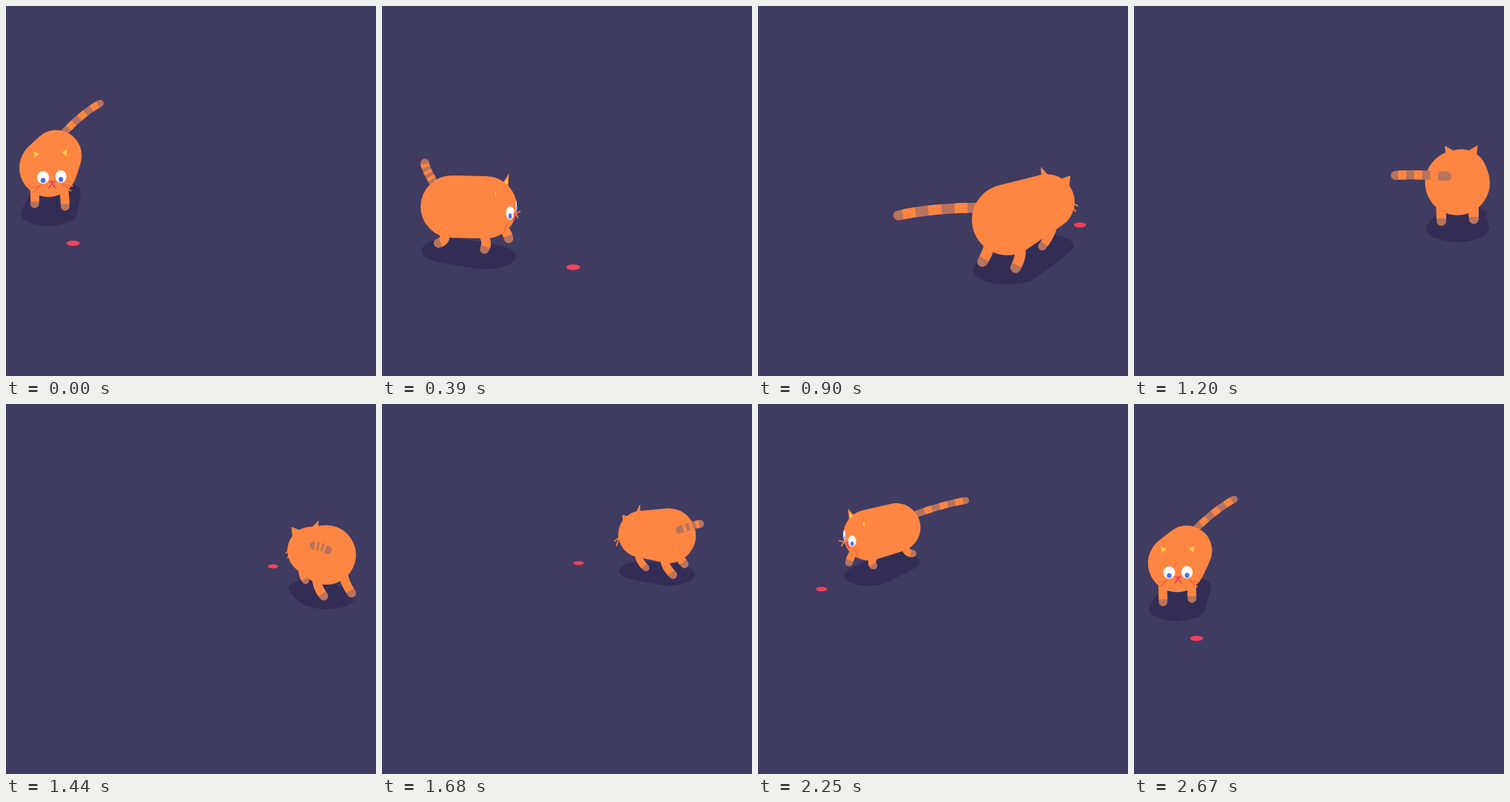
Recreate the animation shown at these times as an HTML page. Size 500x500 px, loop 2.7 s.

```html
<!DOCTYPE html>
<html lang="en">
<head>
<meta charset="utf-8">
<title>Cat chasing a dot</title>
<style>
  html, body { margin: 0; height: 100%; overflow: hidden; background: #403b61; }
  svg { display: block; width: 100%; height: 100%; }
</style>
</head>
<body>
<svg id="stage" viewBox="0 0 500 500"></svg>
<script>
const LOOP = 2700;
const STRIDES = 7;
const TILT = 0.42, RISE = 0.9;   // how much ground depth and height show on screen
const ORANGE = '#ff8642', BROWN = '#b8735c', PINK = '#f0425a', SHADE = '#332d55',
      YELLOW = '#ffd04a', BLUE = '#4a6cf0', BLUSH = '#f5673f';

// Key points of the chase: time, rump, head, tail tip, dot
const CHASE = [
  [0,    68, 202,    57.5, 218.5,  127.5, 131.5,  90.5, 320.5],
  [390,  94, 271,    140, 272,     58, 212,       258, 353],
  [900,  336.5, 289, 390, 265,     189, 283,      435, 296],
  [1200, 437, 239,   443, 228,     353, 229,      437, 239],
  [1680, 387.5, 178, 351, 176,     430, 162,      266, 215],
  [2250, 187, 167,   150, 177,     281, 130.5,    86, 250]
];
const SIDES = [-1, 1];           // right, left

const { sin, cos, max, PI } = Math;
const rad = degrees => degrees * PI / 180;

// Smooth closed curve through the key points
function chaseAt(t) {
  const n = CHASE.length, key = i => CHASE[(i + n) % n];
  const span = i => (key(i + 1)[0] - key(i)[0] + LOOP) % LOOP;
  const i = CHASE.findLastIndex(k => k[0] <= t);
  const length = span(i), u = (t - key(i)[0]) / length;
  return key(i).slice(1).map((from, c) => {
    const slope = k => (key(k + 1)[c + 1] - key(k)[c + 1]) / span(k);
    const leave = (slope(i - 1) + slope(i)) / 2, arrive = (slope(i) + slope(i + 1)) / 2;
    return from + length * (slope(i) * u * u * (3 - 2 * u) +
      leave * u * (1 - u) ** 2 + arrive * u * u * (u - 1));
  });
}

// Outline around two balls {x, y, r}
function hull(a, b) {
  const dx = b.x - a.x, dy = b.y - a.y, angle = Math.atan2(dy, dx);
  const lean = max(-.99, Math.min(.99, (a.r - b.r) / Math.hypot(dx, dy)));
  const open = Math.acos(lean);
  const rim = (c, side) => [c.x + c.r * cos(angle + side * open), c.y + c.r * sin(angle + side * open)];
  return `M${rim(a, 1)}A${a.r},${a.r} 0 ${+(lean > 0)} 1 ${rim(a, -1)}` +
    `L${rim(b, -1)}A${b.r},${b.r} 0 ${+(lean < 0)} 1 ${rim(b, 1)}Z`;
}

const shape = (d, fill, extra = '') => `<path d="${d}" fill="${fill}" ${extra}/>`;
const line = (d, color, width, extra = '') =>
  shape(d, 'none', `stroke="${color}" stroke-width="${width}" ${extra}`);
const oval = (x, y, rx, ry, fill) => `<ellipse cx="${x}" cy="${y}" rx="${rx}" ry="${ry}" fill="${fill}"/>`;
const polygon = points => `M${points.join('L')}Z`;

// Brown round stroke with orange dashes on top
const limb = (d, width, length, dashes) =>
  line(d, BROWN, width, 'stroke-linecap="round"') +
  line(d, ORANGE, width, `pathLength="${length}" stroke-dasharray="${dashes}"`);

function draw(t) {
  const [rumpX, rumpY, headX, headY, tipX, tipY, dotX, dotY] = chaseAt(t);
  const lap = 2 * PI * t / LOOP;
  const heading = rad(77) - lap + rad(12) * cos(lap + PI / 3);
  const facing = sin(heading);   // 1 towards the viewer, -1 away

  // Balls grow towards the viewer
  const ball = (x, y, grow) => ({ x, y, r: (34.5 + .085 * (y - 177)) * grow });
  const rump = ball(rumpX, rumpY, 1.02 * (1 - .08 * facing));
  const head = ball(headX, headY, .96 * (1 + .08 * facing));
  const body = hull(rump, head);

  // Screen point from a ball's centre: forward, left and up, in radii
  const place = (c, f, l, h) => [
    c.x + c.r * (f * cos(heading) + l * facing),
    c.y + c.r * (TILT * (f * facing - l * cos(heading)) - RISE * h)
  ];
  // Point over a ball's surface: degrees to the left, degrees up
  const onBall = (c, left, up, reach = 1) => place(c,
    reach * cos(rad(up)) * cos(rad(left)), reach * cos(rad(up)) * sin(rad(left)), reach * sin(rad(up)));

  const leg = (c, side, centre, amount, phase) => {
    const step = STRIDES * lap - rad(phase);
    const f = centre + amount * cos(step), lift = .15 * max(0, -sin(step));
    const hip = place(c, f * .3, side * .5, -.6);
    const knee = place(c, f * .6 + .2, side * .5, -1);
    const paw = place(c, f, side * .5, lift - 1.25);
    return limb(`M${hip}Q${knee} ${paw}`, c.r * .3, 1, '.88 2');
  };
  const legs = leg(head, -1, -.2, .8, -60) + leg(head, 1, -.2, .8, 10) +
    leg(rump, -1, -.5, .4, 60) + leg(rump, 1, -.5, .4, 30);

  const [rootX, rootY] = onBall(rump, 155, 35);
  const bend = [(rootX + tipX) / 2 + (rootX - rump.x) * .3, (rootY + tipY) / 2 + (rootY - rump.y) * .3];
  const tail = limb(`M${rootX},${rootY}Q${bend} ${tipX},${tipY}`, rump.r * .28, 6.45, '0 1.1 1 1 1 1 1 9');
  const tailInFront = heading < rad(-75) && heading > rad(-165);

  const ears = SIDES.map(s => [onBall(head, s * 30, 55, .97), onBall(head, s * 49, 50, 1.3), onBall(head, s * 48, 35, .97)]);
  const inner = ears.map(ear => {
    const middle = [0, 1].map(k => (ear[0][k] + ear[1][k] + ear[2][k]) / 3);
    return polygon(ear.map(p => p.map((v, k) => middle[k] + (v - middle[k]) * .55)));
  }).join('');
  const whiskers = SIDES.map(s =>
    `M${onBall(head, s * 38, -15, 1.2)}L${onBall(head, s * 23, -14)}L${onBall(head, s * 38, -26, 1.2)}`).join('');

  const eyes = SIDES.map(s => {
    const turn = sin(heading - rad(s * 18));
    if (turn < -.15) return '';
    const [x, y] = onBall(head, s * 18, 5);
    const rx = head.r * .21 * max(.2, turn), ry = head.r * .215;
    return oval(x, y, rx, ry, '#fff') + oval(x, y + ry * .47, rx * .4, ry * .4, BLUE);
  }).join('');
  const [noseX, noseY] = onBall(head, 0, -9);
  const w = head.r * .13 * max(.4, facing), drop = head.r * .15;
  const mouth = shape(`M${noseX - w},${noseY - drop * .7}h${2 * w}L${noseX},${noseY + 1}Z`, PINK) +
    line(`M${noseX - w},${noseY + drop}L${noseX},${noseY}L${noseX + w},${noseY + drop}`, PINK, 1.8);

  // The shadow is the body's hull laid flat on the ground
  const onGround = (c, below) => ({ x: c.x, y: (c.y + c.r * below) / TILT, r: c.r * .97 });
  const shadow = hull(onGround(rump, 1.42), onGround(head, 1.58));
  const dotSize = 7 + .018 * (dotY - 215);

  stage.innerHTML =
    `<clipPath id="fur"><path d="${body}"/></clipPath>` +
    shape(shadow, SHADE, `transform="scale(1 ${TILT})"`) +
    oval(dotX, dotY, dotSize, dotSize * .4, PINK) +
    (tailInFront ? '' : tail) + legs +
    line(whiskers, ORANGE, 1.6, 'stroke-linecap="round"') +
    shape(ears.map(polygon).join(''), ORANGE, `stroke="${ORANGE}" stroke-linejoin="round"`) +
    shape(body, ORANGE) +
    (facing > 0 ? shape(inner, YELLOW) : '') +
    `<g clip-path="url(#fur)">${facing > 0 ? line(whiskers, BLUSH, 1.4) : ''}${eyes}${facing > 0 ? mouth : ''}</g>` +
    (tailInFront ? tail : '');
}

const stage = document.getElementById('stage');
const start = performance.now();
function tick() {
  draw((performance.now() - start) % LOOP);
  requestAnimationFrame(tick);
}
tick();
</script>
</body>
</html>
```
